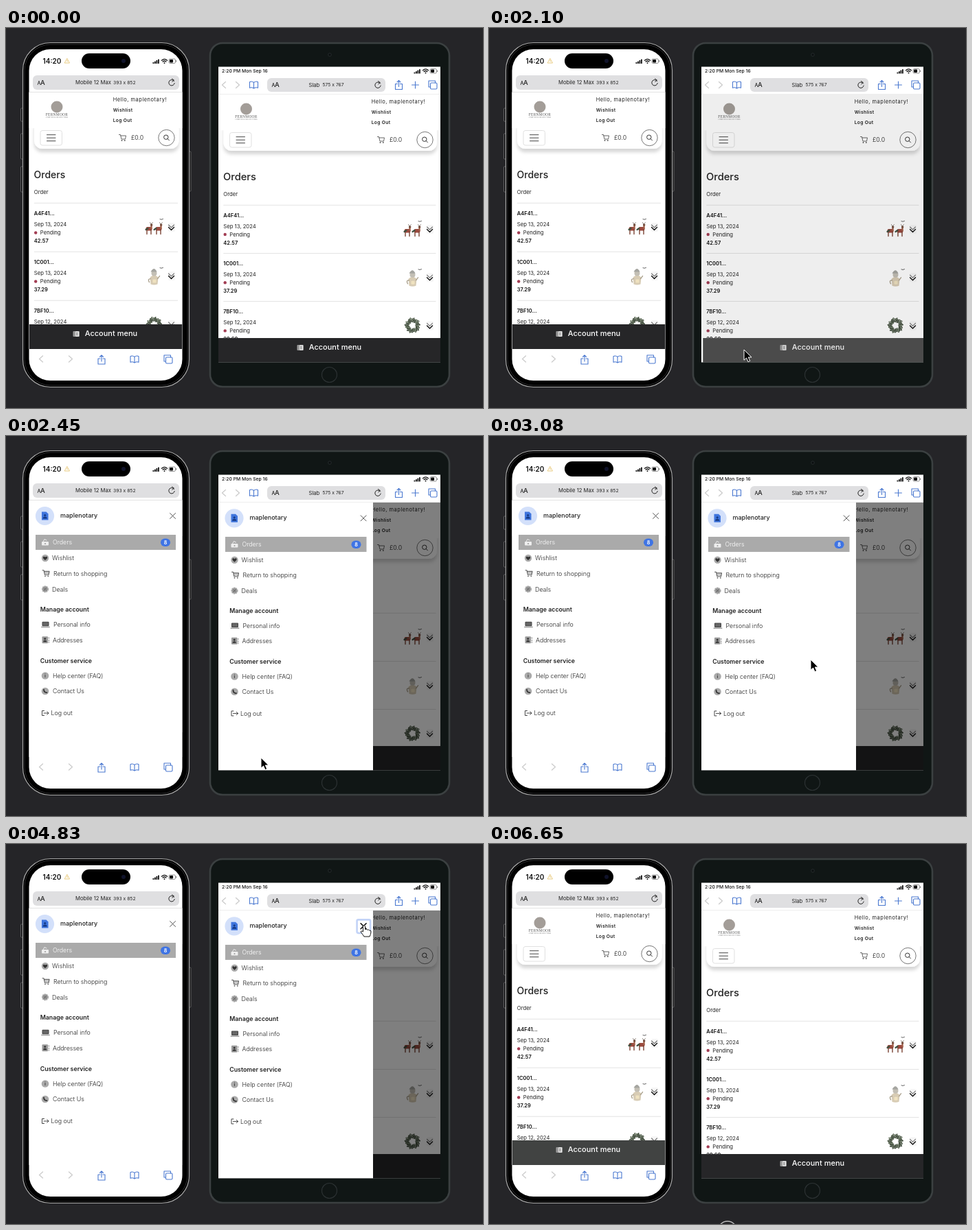
Recreate the animation shown at these times as an HTML page. Size 694 px wide and 554 px high, loop 6720 ms.

```html
<!DOCTYPE html>
<html lang="en">
<head>
<meta charset="utf-8">
<title>Account menu</title>
<style>
  html, body { margin: 0; width: 100%; height: 100%; overflow: hidden; background: #252528; }
  svg { display: block; width: 694px; height: 554px; font-family: Inter, sans-serif; }
  text { white-space: pre; }
  .line { fill: none; stroke-linecap: round; stroke-linejoin: round; }
  .item rect.bg { fill: transparent; }
  .item.on rect.bg { fill: #aaa; }
  .item.on text.label { fill: #fff; }
</style>
</head>
<body>
<svg id="stage" viewBox="0 0 694 554"></svg>
<script>
const LOOP = 6720, STEP = 70;
const USER = 'maplenotary';
const BLUE = '#4a78d0';

const devices = [
  { name: 'phone', x: 33.5, y: 94, w: 223, h: 374, left: 0, right: 0, down: 0, pitch: 71, bar: 432, barShift: 0,
    heading: 14, panelW: 223, panelRight: 0, delay: 23, rowY: y => y },
  { name: 'tablet', x: 309, y: 97, w: 323, h: 390.5, left: 275.5, right: 376, down: 3, pitch: 70.2, bar: 452, barShift: 326,
    heading: 14.7, panelW: 225, panelRight: 277.5, delay: 0, rowY: y => y * .99 + 4.5 },
];

const orders = [
  ['A4F41...', 'Sep 13, 2024', '42.57'],
  ['1C001...', 'Sep 13, 2024', '37.29'],
  ['7BF10...', 'Sep 12, 2024', '29.60'],
];

// label, phone centre y, label x, icon
const items = [
  ['Orders', 155, 68, 'basket'], ['Wishlist', 178, 67, 'heart'],
  ['Return to shopping', 200.3, 69, 'cart'], ['Deals', 223.3, 67, 'deal'],
  ['Personal info', 274.7, 69, 'laptop'], ['Addresses', 297.3, 68, 'book'],
  ['Help center (FAQ)', 349.5, 68, 'info'], ['Contact Us', 372, 68, 'call'],
  ['Log out', 404, 65.5, 'exit'],
];

// ---- drawing helpers: y of text is the middle of its capitals ----
const text = (s, x, y, size, { w = 400, c = '#222', ls = 0, a = 'start', cls = '', font = '' } = {}) =>
  `<text class="${cls}" x="${x}" y="${y + size * .363}" font-size="${size}" font-weight="${w}" fill="${c}" ` +
  `letter-spacing="${ls}" text-anchor="${a}" ${font && `font-family="${font}"`}>${s}</text>`;
const rect = (x, y, w, h, fill, r = 0, more = '') =>
  `<rect x="${x}" y="${y}" width="${w}" height="${h}" rx="${r}" fill="${fill}" ${more}/>`;
const circle = (x, y, r, fill, more = '') => `<circle cx="${x}" cy="${y}" r="${r}" fill="${fill}" ${more}/>`;
const line = (d, c = '#222', w = 1) => `<path class="line" d="${d}" stroke="${c}" stroke-width="${w}"/>`;
const shape = (d, c) => `<path d="${d}" fill="${c}"/>`;
const at = (x, y, body, more = '') => `<g transform="translate(${x} ${y})" ${more}>${body}</g>`;
const outline = (c, w = 1) => `stroke="${c}" stroke-width="${w}"`;

const cart = (c, w = .9) => line('M-5-4.5H-3L-1.5 2H4L5-3H-2.6', c, w) + circle(-1, 4, .9, c) + circle(3.3, 4, .9, c);

const icons = {
  basket: rect(-5, -1, 10, 5.5, '#eee', 1) + line('M-3-1L-1-4.5L2-3', '#eee') + circle(0, 2, 1, '#999'),
  heart: circle(0, 0, 5.2, '#aaa') + shape('M0 3C-6-1-2-4 0-1.4C2-4 6-1 0 3Z', '#333'),
  cart: at(1, 0, cart('#555', 1.1) + line('M-1.5-2H4M-1 0H4', '#777', .8)),
  deal: circle(0, 0, 4.2, '#999', 'stroke="#aaa" stroke-width="1.8" stroke-dasharray="2 1"') +
        line('M-1.6 1.6L1.6-1.6M-1.4-1.2H-1.3M1.3 1.3H1.4', '#444', .9),
  laptop: rect(-4.5, -4, 10, 6.5, '#444', 1) + rect(-3.5, -3, 8, 4.5, '#666') + rect(-6, 3, 13, 1.5, '#999', .7),
  book: rect(-4.5, -5, 8.5, 10, '#999', 1) + circle(-.3, -1.6, 1.4, '#333') + shape('M-2.8 3a2.5 2.5 0 0 1 5 0Z', '#333') +
        line('M5.4-3.5V-2M5.4 0V1.5M5.4 3V4', '#888', 1),
  info: circle(0, 0, 5.3, '#aaa') + text('i', 0, 0, 7, { w: 700, c: '#444', a: 'middle' }),
  call: circle(0, 0, 5.3, '#aaa') + line('M-2-2.4Q-2 2 2.4 2.2', '#333', 1.8),
  exit: line('M-1.5-3.5H-4.5V3.5H-1.5M-2 0H5M2.8-2.2L5 0L2.8 2.2', '#333', .9),
};

const browser = {
  back: line('M2.5-4.5L-2.5 0L2.5 4.5', '#ccc', 1.3),
  next: line('M-2.5-4.5L2.5 0L-2.5 4.5', '#ccc', 1.3),
  share: line('M-2-2H-5V6H5V-2H2M0 2V-7M-2.5-4.5L0-7L2.5-4.5', BLUE, 1.1),
  book: line('M0-3.5Q-3-6-6-4.2V4.2Q-3 3 0 5Q3 3 6 4.2V-4.2Q3-6 0-3.5V5', BLUE, 1.1),
  tabs: rect(-3.5, -3, 9.5, 9, 'none', 1.5, outline(BLUE, 1.1)) + line('M-3.5 3H-6V-6H3.5V-3', BLUE, 1.1),
  plus: line('M-5 0H5M0-5V5', BLUE, 1.1),
  reload: line('M3.6-2A4.2 4.2 0 1 0 4.2 1M.5-5.4L3.4-3.5L.8-1.2', '#222', 1),
};

const status = (x, y) => at(x, y,
  [0, 1, 2, 3].map(i => rect(i * 2.5, 2 - i * 1.5, 1.8, 2 + i * 1.5, '#111', .4)).join('') +
  line('M13-.8Q17-4.4 21-.8M14.6 1Q17-1 19.4 1', '#111', 1.3) + circle(17, 3, 1, '#111') +
  rect(23.5, -3, 9.5, 6.5, 'none', 1.8, outline('#777', .8)) + rect(24.6, -1.9, 5, 4.3, '#111', .8) +
  rect(33.7, -1, 1, 2.4, '#777', .5));

const addressBar = (x, y, w, h, device, nameX, size, sizeX) => {
  const mid = y + h / 2;
  return rect(x, y, w, h, '#dfdfe1', 6) + text('A', x + 6.5, mid + .8, 7, { w: 500 }) +
    text('A', x + 11, mid, 9.5, { w: 500 }) + text(device, nameX, mid, 7.7) + text(size, sizeX, mid, 6.8) +
    at(x + w - 11, mid, browser.reload);
};

const deer = rect(-5, -1, 9, 5.5, '#9c4a3f', 2.2) + line('M-3.5 3V9.5M2.5 3V9.5', '#7a4334', 1.4) +
  line('M3 1V-3.5', '#a2604a', 2.4) + circle(3.2, -4, 1.7, '#765040') + line('M1-7.5L2.5-5L5-7.5', '#665a50', .7);

// a ring of short leaves spread by the golden angle
const wreath = Array.from({ length: 110 }, (_, i) => {
  const a = i * 2.4, r = 4.5 + i * 3 % 11 / 2, b = a + .9;
  return line(`M${r * Math.cos(a)} ${r * Math.sin(a)}l${2.6 * Math.cos(b)} ${2.6 * Math.sin(b)}`,
    ['#2d382b', '#46543f', '#5f6d58'][i % 3], 1.1);
}).join('');

const photos = [
  at(-7, 0, deer) + at(7, 0, deer) + line('M-12 3L-9 1M0 3L3 1', '#3f5140', 2.2),
  shape('M-6 2Q0-4 6 2L5 12Q0 14-5 12Z', '#d8ccb4') + circle(0, -4, 4, '#c3bfb5') +
    shape('M-5-6Q0-15 4-6Z', '#a5a5a0') + line('M-5 4Q-10 4-7 9M5 4L8 0', '#aba18d', 1.4) + rect(-2, 5, 5, 5, '#efe2c0', 1),
  wreath,
];

function orderRow(d, [id, date, total], i) {
  const y = 270 + d.down + i * d.pitch, x = 40.8 + d.left, px = 215.5 + d.right;
  const gap = d.down ? 0 : .5;
  return rect(x, y - 15.2, d.x + d.w - 6.5 - x, .8, '#dcdcdc') +
    text(id, x, y, 7.5, { w: 600, c: '#111' }) + text(date, x, y + 16 + gap, 7.7) +
    circle(x + 2.4, y + 28 + gap, 2.2, '#a23c52') + text('Pending', x + 9, y + 28 + gap, 7.7) +
    text(total, x, y + 40 + gap, 7.5, { w: 600, c: '#111' }) +
    at(px, y + 21 - i * .4, photos[i]) +
    (i < 2 ? line(`M${px + 8.5} ${y + 8.5}l2 .8l2.5-1`, '#777', 1.1) : '') +
    rect(px + 20.5, y + 14, 10, 13, '#f6f6f6', 2) +
    line(`M${px + 21} ${y + 17}l4 4l4-4`, '#777', 1.1) + line(`M${px + 21} ${y + 20.5}l4 4l4-4`, '#111', 1.4);
}

function page(d) {
  const L = d.left, R = d.right, y = d.down;
  return rect(d.x, d.y, d.w, d.h, '#fff') +
    rect(41 + L, 132 + y, d.w - 12.5, 44, '#fff', 12, 'filter="url(#shade)"') +
    rect(d.x, d.y, d.w, 52, '#fff') +
    circle(74 + L, 115 + y, 8.5, '#a39d98') +
    text('FERNMOOR', 74 + L, 126 + y, 5.4, { a: 'middle', ls: .3, c: '#555', font: 'Liberation Serif, serif' }) +
    text('A HOME FOR OLD AND LOVELY THINGS', 74 + L, 130 + y, 1.7, { a: 'middle', c: '#777' }) +
    text(`Hello, ${USER}!`, 155.7 + R, 104.5 + y, 7.5, { ls: .5 }) +
    text('Wishlist', 155.7 + R, 120 + y, 6.7, { w: 600, ls: .35 }) +
    text('Log Out', 155.7 + R, 134.5 + y, 6.7, { w: 600, ls: .35 }) +
    rect(50 + L, 149.5 + y, 31.5, 21.5, '#fff', 3, outline('#ddd', .9)) +
    line([155.7, 160.2, 164.7].map(v => `M${59.5 + L} ${v + y}h12.5`).join(''), '#444', 1) +
    at(169.5 + R, 160 + y, cart('#555')) + text('£0.0', 182 + R, 160 + y, 8.6, { c: '#444' }) +
    circle(233.5 + R, 160 + y, 11.7, '#fff', outline('#555', .8)) +
    circle(232.8 + R, 159.2 + y, 3.2, 'none', outline('#333', 1)) + line(`M${235.2 + R} ${161.6 + y}l2.3 2.3`, '#333', 1) +
    text('Orders', 40.5 + L, 214 + y, d.heading, { w: 500 }) + text('Order', 40.8 + L, 239.5 + y, 7.7) +
    orders.map((o, i) => orderRow(d, o, i)).join('') +
    rect(d.x, d.bar, d.w, d.y + d.h - d.bar, '#262628', 0, `id="${d.name}Bar"`) +
    at(102 + d.barShift, d.bar + 14, rect(-4.5, -4, 9, 8, '#999', 1) + rect(-1, -4, 5.5, 8, '#ddd', 1) + line('M1.2-2V2', '#444', .8)) +
    text('Account menu', 114.7 + d.barShift, d.bar + 13.5, 11, { w: 500, c: '#fff' });
}

function panel(d) {
  const L = d.left, R = d.panelRight, Y = d.rowY;
  const rowX = 43 + (d.down && 276), rowEnd = 247 + R;
  const heading = (s, y) => text(s, 49.7 + L, Y(y), 8.8, { w: 600 });
  const item = ([label, y, x, icon], i) => `<g class="item ${i ? '' : 'on'}">` +
    rect(rowX, Y(y) - 11, rowEnd - rowX, 22, '', 0, 'class="bg"') + at(57 + L, Y(y), icons[icon]) +
    text(label, x + L, Y(y), 8.9, { w: 300, cls: 'label' }) + '</g>';
  return rect(d.x - 1, d.y, d.panelW + 1, d.h, '#fff') +
    at(56.5 + L, Y(116.5), circle(0, 0, 13.6, '#d3e0fa') + shape('M-4.5-6H2L5-3V6H-4.5Z', '#3f75dd') +
      circle(.2, -1, 1.6, '#153a86') + shape('M-2.8 4a3 3 0 0 1 6 0Z', '#153a86')) +
    text(USER, 79 + L, Y(115.5), 9, { w: 500 }) +
    items.map(item).join('') + heading('Manage account', 253) + heading('Customer service', 328) +
    rect(225 + R, Y(155.3) - 5.7, 14, 11.4, '#3f74e4', 5.7) +
    text('8', 232 + R, Y(155.3), 7, { w: 700, c: '#fff', a: 'middle' }) +
    at(242.6 + R, Y(116.5),
      rect(-9.5, -9.5, 19.5, 19.5, '#fff', 2, outline('#c2d3f7', 2.6) + ` id="${d.name}Focus" opacity="0"`) +
      `<path id="${d.name}Close" class="line" d="M-4-4L4 4M4-4L-4 4" stroke="#555" stroke-width="1"/>`);
}

const screen = d => `<clipPath id="${d.name}Clip">${rect(d.x, d.y, d.w, d.h, '#000')}</clipPath>` +
  `<g clip-path="url(#${d.name}Clip)">${page(d)}` +
  rect(d.x, d.y, d.w, d.h, '#000', 0, `id="${d.name}Shade"`) + `<g id="${d.name}Panel">${panel(d)}</g></g>`;

const button = (x, y, h) => rect(x, y, 3, h, '#1b1b1d', 1, outline('#777', .7));
const phoneFrame =
  button(21.5, 117, 19) + button(21.5, 154, 37) + button(21.5, 202, 37) + button(266, 180, 58) +
  rect(24.5, 21.5, 242, 502, '#000', 40, outline('#a8a8a8', 1.2)) +
  rect(27, 24, 237, 497, '#000', 38, outline('#2c2c2e', 1)) +
  rect(33.5, 31, 223, 483, '#fff', 31) + rect(110, 37, 71, 22, '#000', 11) + circle(171, 48, 3, '#10132a') +
  text('14:20', 53.5, 48, 10, { w: 600, c: '#111' }) +
  line('M89 44.7L92.5 51H85.5ZM89 47V49', '#e8c878', .9) + status(213.5, 48) +
  addressBar(39, 69, 213, 21, 'Mobile 12 Max', 101, '393 x 852', 156) +
  at(51, 482.5, browser.back) + at(94, 482.5, browser.next) + at(139, 484, browser.share) +
  at(187, 483, browser.book) + at(236, 483, browser.tabs) + rect(33.5, 93, 223, .8, '#ddd');

const tabletFrame =
  rect(297, 22, 348, 501, '#101615', 18, outline('#3b4041', 2.6)) +
  circle(471, 39, 2.3, '#0b0f10', outline('#262c2d', 1)) + circle(470.5, 505.5, 11, '#101615', outline('#2c3233', 1.2)) +
  rect(309, 56.5, 323, 41.5, '#fff') + text('2:20 PM Mon Sep 16', 314, 62.7, 6.8, { w: 500, c: '#111' }) + status(593.5, 62.5) +
  at(317, 83, browser.back) + at(337, 83, browser.next) + at(360.5, 83, browser.book) +
  addressBar(380, 73, 172, 20, 'Slab', 440.5, '575 x 767', 460.5) +
  at(571.5, 83.5, browser.share) + at(595.5, 83, browser.plus) + at(621, 83, browser.tabs) + rect(309, 96.5, 323, .8, '#ddd');

document.getElementById('stage').innerHTML =
  `<filter id="shade" x="-10%" y="-30%" width="120%" height="170%">
     <feDropShadow dx="0" dy="5" stdDeviation="2.5" flood-color="#000" flood-opacity=".16"/></filter>` +
  rect(0, 0, 694, 554, '#252528') + phoneFrame + tabletFrame + devices.map(screen).join('') +
  circle(347, 564, 14, 'none', 'id="touch" stroke="#bbb" stroke-width="1.3"') +
  `<g id="cursor">
    <path id="arrow" d="M0 0V15.2L3.6 12L6 17.6L8.7 16.4L6.3 11H11Z" fill="#000" stroke="#fff" stroke-width="1"/>
    <path id="hand" d="M-1.5 1.2Q0-1 1.5 1.2V6Q3.5 4.8 4.5 6.6Q6.5 5.6 7.4 7.4Q10 6.6 10 9.4Q10 13 8 16.5H0Q-2 13.5-4.8 9.6Q-4.6 7.4-1.5 9.4Z" fill="#fff" stroke="#111" stroke-width="1"/>
  </g>`;

// ---- motion ----
const path = [
  [0, 280, 560], [140, 280, 560], [630, 299, 525], [770, 299, 525], [1470, 363, 474], [1820, 371, 469],
  [2590, 371, 469], [3080, 468, 326], [3290, 508, 272], [3500, 508, 272], [4200, 519, 123], [4480, 521, 119],
  [5180, 521, 118], [5320, 516, 130], [5740, 345, 520], [5810, 345, 520], [6020, 343, 560], [LOOP, 343, 560],
];
const clamp = v => Math.min(1, Math.max(0, v));
const ease = v => .5 - .5 * Math.cos(Math.PI * clamp(v));
const OPEN = 2078, CLOSE = 4835, SLIDE = 345, FADE = 170;

function cursorAt(t) {
  const i = path.findIndex(k => k[0] > t);
  const [t0, x0, y0] = path[i - 1], [t1, x1, y1] = path[i], f = (t - t0) / (t1 - t0);
  return [x0 + (x1 - x0) * f, y0 + (y1 - y0) * f];
}

const set = (id, attrs) => {
  const node = document.getElementById(id);
  for (const key in attrs) node.setAttribute(key, attrs[key]);
};
const tabletRows = [...document.querySelectorAll('#tabletPanel .item')];

function draw(t) {
  for (const d of devices) {
    const start = OPEN + d.delay;
    const open = ease((t - start) / SLIDE) - ease((t - CLOSE) / SLIDE);
    const shade = clamp((t - start) / FADE) - clamp((t - CLOSE) / FADE);
    set(d.name + 'Panel', { transform: `translate(${(open - 1) * d.panelW} 0)` });
    set(d.name + 'Shade', { opacity: shade / 2 });
  }

  const [x, y] = cursorAt(t);
  const inList = t > 2450 && t < 4200 && x < 525;
  const hovered = inList ? items.findIndex(it => Math.abs(devices[1].rowY(it[1]) - y) < 11) : -1;
  tabletRows.forEach((row, i) => row.classList.toggle('on', i === 0 || i === hovered));

  const onClose = t >= 4130 && t < 5100;
  const hand = onClose || hovered >= 0;
  set('cursor', { transform: `translate(${x} ${y})` });
  set('arrow', { opacity: hand ? 0 : 1 });
  set('hand', { opacity: hand ? 1 : 0 });
  set('tabletClose', { stroke: onClose ? '#000' : '#555', 'stroke-width': onClose ? 1.5 : 1 });
  set('tabletFocus', { opacity: t >= 4690 && t < 5180 ? 1 : 0 });

  const last = t >= LOOP - STEP;
  set('tabletBar', { fill: t >= 1400 && t < 2170 ? '#505050' : '#262628' });
  set('phoneBar', { fill: last ? '#414342' : '#262628' });
  set('touch', { opacity: last ? 1 : 0 });
}

function tick() {
  draw(Math.floor(performance.now() % LOOP / STEP) * STEP);
  requestAnimationFrame(tick);
}
tick();
</script>
</body>
</html>
```
